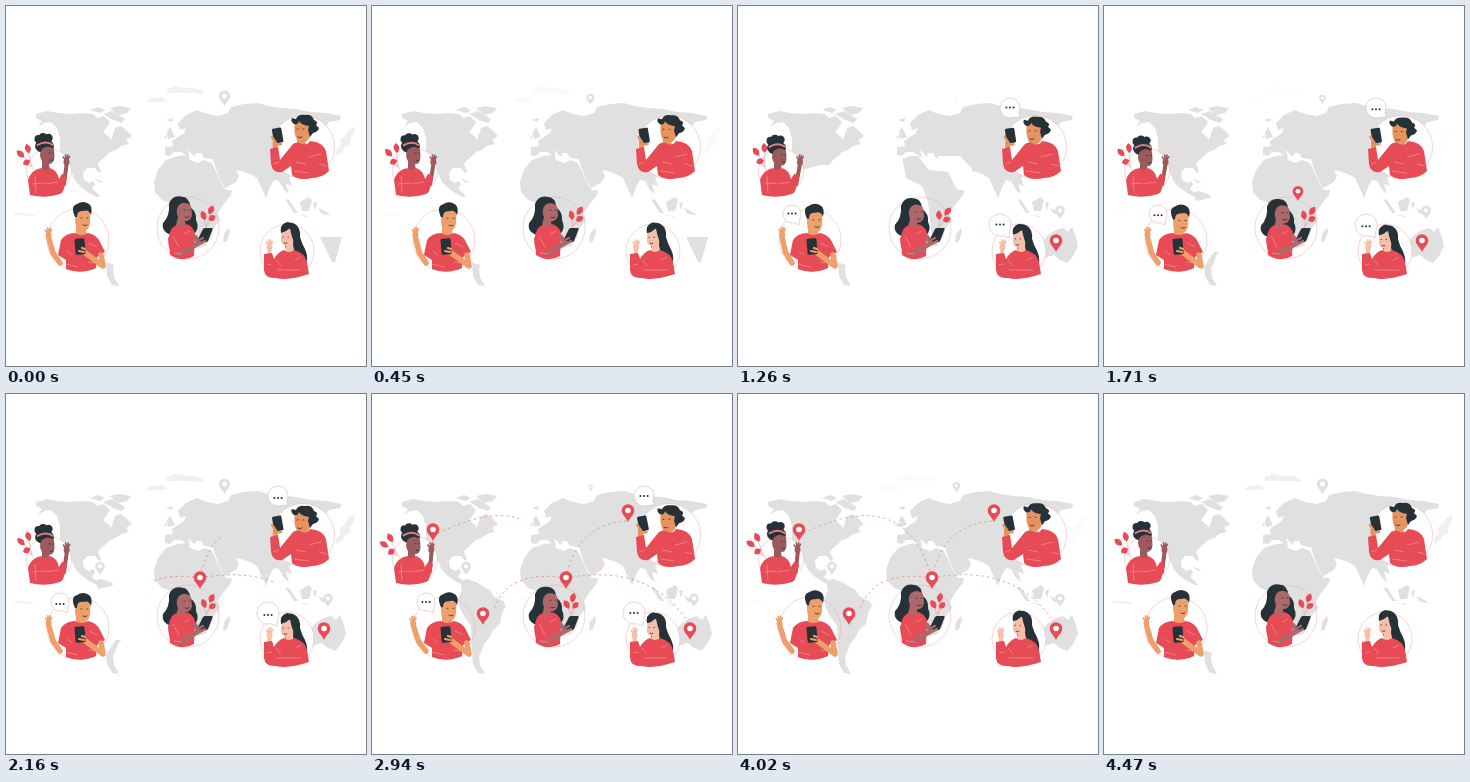
An HTML page for the animation above (4500 ms loop, 360 by 360 pixels).

```html
<!DOCTYPE html>
<html lang="en">
<head>
<meta charset="utf-8">
<style>
html, body { margin: 0; width: 100%; height: 100%; overflow: hidden; background: #fff }
svg { display: block; width: 100%; height: 100% }
.map { fill: #e0e0e0 }
.cloud { fill: #f1f0f0 }
.red { fill: #e74b56 }
.dark { fill: #263238 }
.ring { fill: #fff; stroke: #f0a8ab; stroke-width: .5 }
.clear { fill: none }
.fold { fill: none; stroke: #f3a0a4; stroke-width: .6 }
.line { fill: none; stroke-linecap: round; stroke-linejoin: round }
.face { fill: none; stroke: #263238; stroke-width: .8; stroke-linecap: round }
.arc { fill: none; stroke: #ee7b82; stroke-width: .75; stroke-dasharray: 2.5 3 }
</style>
</head>
<body>
<svg viewBox="0 0 360 360" id="stage">
<defs>
  <clipPath id="africaEast"><path d="M188 182L200 165H229V240H200L193 205Z"/></clipPath>
  <clipPath id="africaNorth"><path d="M164 150H180L191 164L212 166L230 182V240H195L190 196L184 180L168 172Z"/></clipPath>
  <clipPath id="noMiddleEast"><path clip-rule="evenodd" d="M150 90H350V220H150ZM200 150H222L234 163V186H205Z"/></clipPath>
  <clipPath id="tail"><path d="M99 256L114 261V285H98Z"/></clipPath>
  <clipPath id="longTail"><path d="M88 182H111L106 192L92 195ZM99 262L110 246H120V285H98Z"/></clipPath>
  <clipPath id="ausEast"><path d="M314 231H336L328 260Z"/></clipPath>
</defs>
<g class="map">
  <path d="M30 108L41 105L52 107L65 108L76 107L87 108L91 112L98 110L104 116L101 121L97 126L103 131L105 134L109 122L115 120L120 124L126 130L120 134L123 138L115 140L110 144L104 146L100 150L94 155L91 159H82L64 164L58 157L54 148V132L51 122L45 116L38 117L32 121L36 115L30 112Z"/>
  <path d="M84 104L92 101L99 104L94 107ZM97 108L106 105L112 109L119 113L116 117L107 114ZM104 102L113 100L125 102L121 107L112 109Z"/>
  <path id="mexico" d="M62 158L92 158L95 166L93 167L89 162L81 162L77 167L78 174L83 177L87 175L89 178L86 183L91 187L94 191L91 191L83 187L76 182L70 176L66 167ZM88 172L97 176L94 177Z"/>
  <path id="america" d="M88 187L95 185L104 188L112 193L118 196L121 202L131 207L134 212L130 219L128 230L121 236L117 244L112 250L110 256L107 262L108 271L113 280L106 279L101 270L100 258L99 232L92 222L87 212L86 205L90 196Z"/>
  <path id="africa" d="M160 154L172 150L182 149L184 154L192 157L198 154L206 157L211 168L217 180L220 184L226 184L225 189L217 199L212 207L214 214L207 223L205 232L199 240L192 242L188 238L184 225L183 212L180 200L176 196L165 197L156 194L149 186L148 176L152 164Z"/>
  <path d="M223 222L224 226L221 235L217 237L218 228Z"/>
  <path id="eurasia" d="M159 141L167 140L166 135L172 131L178 127L180 122L174 124L172 117L180 109L191 104L198 107L206 109L212 110L222 107L225 101L238 98L252 97L262 100L276 102L290 103L305 106L320 107L335 110L334 114L323 116L319 122L314 129L309 122L301 120L296 126L302 135L296 143L290 148L294 157L290 166L283 172L286 180L280 178L283 188L278 184L273 175L268 174L264 181L260 192L256 183L251 172L244 168L235 165L230 164L233 170L230 176L219 182L213 171L209 160L207 153L198 152L195 147L190 147L189 151L182 144L184 152L175 146L168 146L164 150L159 149Z"/>
  <path d="M161 126L164 121L169 131L162 133ZM158 130L161 129L160 133ZM160 114L167 112L166 116Z"/>
  <path d="M279 193L283 194L292 207L288 207ZM294 196L303 191L306 194L303 205L296 205ZM307 197L311 196L309 204ZM291 209L302 210V211ZM312 202L319 205L325 209L316 208Z"/>
  <path id="australia" d="M303 237L310 229L318 224L325 222L330 226L334 221L338 231L340 240L335 250L329 257L322 254L316 249L306 252L303 246Z"/>
</g>
<g class="cloud" id="clouds">
  <path d="M161 85Q160 81 166 82Q168 78 173 81Q180 82 186 82Q197 83 198 88Q180 86 161 87Z"/>
  <path d="M141 95Q145 90 150 92Q157 89 161 95Q150 97 141 96Z"/>
  <path d="M7 209Q11 205 16 207Q25 207 30 210Z"/>
  <path d="M330 150Q329 143 335 139Q331 134 339 130Q342 122 348 121Q350 127 344 133Q347 139 338 142Q337 148 330 150Z"/>
</g>
<g id="arcs"></g>
<g id="people"></g>
<g id="pins"></g>
<g id="bubbles"></g>
</svg>
<script>
const LOOP = 4500;
const $ = id => document.getElementById(id);
const limb = (d, color, w) => `<path class="line" d="${d}" stroke="${color}" stroke-width="${w}"/>`;
const shape = (cls, d) => `<path class="${cls}" d="${d}"/>`;
const skin = (color, d) => `<path fill="${color}" d="${d}"/>`;
const ring = (x, y, r, cls = '') => `<circle class="ring ${cls}" cx="${x}" cy="${y}" r="${r}"/>`;
const head = (...parts) => `<g class="head">${parts.join('')}</g>`;
const sway = (x, y, angle, ...parts) => `<g class="sway" data-sway="${x} ${y} ${angle}">${parts.join('')}</g>`;
const leaf = (x, y, angle, len) =>
  `<path class="red" d="M0 ${-len}Q6 0 0 ${len}Q-6 0 0 ${-len}" transform="translate(${x} ${y}) rotate(${angle})"/>`;
const hand = (x, y, color) => limb(
  `M${x} ${y}l-3.2 -5M${x} ${y}l-1 -7M${x} ${y}l1.3 -7M${x} ${y}l3 -5.5`, color, 1.6) +
  `<ellipse cx="${x}" cy="${y}" rx="3" ry="3.5" fill="${color}"/>`;

const brown = '#9c5a5c', tan = '#ef9f6b', rose = '#ad686b', amber = '#e6935f', pale = '#f6bfaa';

const people = [
  // north-west
  ring(43, 165, 22.5) +
  sway(27, 164, 12, shape('fold', 'M28 164L16 148M26 161L22 145M25 161L19 157'),
    leaf(14.5, 148, -50, 5), leaf(21.8, 142.5, -18, 5), leaf(20.5, 156.5, 62, 4)) +
  head('<g class="dark"><circle cx="32.5" cy="133" r="4"/><circle cx="37" cy="131" r="4"/><circle cx="42.5" cy="132" r="4.2"/><ellipse cx="38.5" cy="140" rx="9.5" ry="7"/></g>',
    skin(brown, 'M36 143Q42 138 48 143L48.5 151Q48 158 43 158L44 164L36 165L36 155Q32 149 36 143Z'),
    limb('M31.5 139Q40 134 47 139', '#e77d80', 2),
    shape('face', 'M43 147h1M47 147h.5M44 154q1.5 1 3 0')) +
  sway(57, 184, 3, limb('M58 178L60.5 159', brown, 4), hand(60.5, 156, brown)) +
  shape('red', 'M24 189L22 174Q25 164 35 162Q39 166 44 162Q51 164 53 173L56 168Q60 168 61 171L58 182Q57 187 54 188Q39 193 24 189Z') +
  shape('fold', 'M26 178L38 177M39 178L52 176M29 170L30 187'),

  // south-west
  ring(72, 234, 31, 'clear') +
  head(skin(tan, 'M70 206Q77 201 84.5 206L84 217Q83 223 80 224L82 232H70V221Q68 214 70 206Z'),
    shape('dark', 'M69 211Q64 200 71 198Q77 194 83 198Q87 201 85 209Q83 203 77 205Q71 204 71 211Z'),
    shape('face', 'M75 212h1M81 212h1M77 219q2 1.5 4 0')) +
  sway(54, 258, 3, limb('M54 257L47 247L43 233', tan, 5.5), hand(42.5, 229, tan)) +
  shape('red', 'M52 249L55 234Q60 227 69 227Q75 231 82 227Q91 229 94 236L99 246L91 251L90 262Q75 269 60 263V254Z') +
  limb('M95 249L97 260L78 246', tan, 5.5) +
  '<rect class="dark" x="69" y="232.5" width="10" height="16" rx="1.5" transform="rotate(-5 74 240)"/>' +
  limb('M78 246l-5 -1M79 243l-3 -1', tan, 2.2) +
  shape('fold', 'M61 245L66 249M60 258L72 261M82 256L88 257M83 237L91 241'),

  // south
  ring(182, 222, 31, 'clear') +
  sway(201, 224, 14, shape('fold', 'M199 226L205 204M200 221L197 209M201 220L206 212'),
    leaf(197.5, 209.5, -22, 5), leaf(205, 204, 25, 5), leaf(206, 212, 55, 4)) +
  head(shape('dark', 'M163 198Q166 189 175 190.5Q184 191 184 201Q191 206 190 214Q194 222 188 228L166 229Q155 226 157 217Q164 210 163 198Z'),
    skin(rose, 'M173 199Q179 194 185 200L186 209Q185 215 179 215L180 223H169L172 211Q169 204 173 199Z'),
    shape('face', 'M178 204h1M183 204h.5M179 211q2 1 4 0')) +
  shape('red', 'M163 231Q164 221 171 219Q176 224 180 218Q187 220 189 227L188 250Q176 257 164 249Z') +
  limb('M189 231L193 237L199 234', rose, 4.5) +
  limb('M168 246Q177 248 185 242L196 235', rose, 5) +
  shape('red', 'M162 232Q169 224 173 234L177 243L169 250Q162 246 162 232Z') +
  shape('dark', 'M192 233L197 223Q198 222 199 222L206 222Q207 222 206.5 223.5L202 235Q201 236 200 236L193 235Z') +
  limb('M193 234L197 232M195 237L199 235', rose, 2.2) +
  shape('fold', 'M167 230L173 241M178 228L184 225M168 247L176 248'),

  // north-east
  ring(297, 141, 31.5) +
  head(skin(amber, 'M289 116Q297 111 304 118L305 127Q303 135 299 136L303 143H291V134Q287 126 289 116Z'),
    shape('dark', 'M288 118Q284 115 286 112L290 113Q292 108 299 109Q306 108 308 114Q313 116 310 119L313 122Q312 126 307 127L304 131L302 124L303 120Q295 119 293 115Q292 119 288 118Z'),
    shape('face', 'M291 123h1M297 123h1M292 131q2 1.5 4 0')) +
  sway(270, 163, 1.5, limb('M269 148L269 136', amber, 5),
    '<rect class="dark" x="267" y="122" width="9.5" height="15" rx="1.3" transform="rotate(-10 272 130)"/>',
    limb('M270 137L266 131M268 139L275 138', amber, 2.5)) +
  shape('red', 'M264 143L272 141L274 154L287 138Q291 135 296 138Q301 140 304 135Q317 136 320 145L323 165Q316 172 306 172Q293 175 286 169L285 160L276 166Q267 168 265 158Z') +
  shape('fold', 'M290 156L300 158M303 151L315 148M288 165L303 167M267 158L273 156M313 158L321 160'),

  // south-east
  ring(281, 245, 27) +
  head(shape('dark', 'M275 221Q281 214 289 218Q295 222 294 231Q296 238 299 243Q304 254 298 261Q284 261 281 248Z'),
    skin(pale, 'M276 224Q282 219 288 226L287 239L289 248H279L280 240Q274 239 275 231Z'),
    shape('dark', 'M275 227Q273 219 281 216Q289 217 291 228L290 239Q286 234 284 222Q280 226 275 227Z'),
    shape('face', 'M277 231h.6M282 231h.6M278 237q1.5 1 3 0')) +
  sway(263, 262, 3, limb('M263 253L263.5 244', pale, 4), hand(263.5, 241, pale)) +
  shape('red', 'M258 248L266 247L268 253Q272 246 278 244Q283 248 288 244Q299 247 301 256L303 268Q282 275 270 272Q259 273 258 264Z') +
  shape('fold', 'M271 264L295 264M270 254L275 260M289 254L295 251M261 259L266 258'),
];
$('people').innerHTML = people.join('');

// x, y of the tip, time in, time out
const redPins = [
  [318, 246, 480, 4050], [194, 195, 1500, 4050], [256, 128, 2350, 4050],
  [61, 147, 2350, 4050], [111, 231, 2350, 4050],
];
const greyPins = [[322, 213, 450, 4050], [94, 181, 1650, 4050]];
const pin = cls => `<g><path class="${cls}" d="M0 0C-2 -5 -6.3 -7 -6.3 -11.5A6.3 6.3 0 1 1 6.3 -11.5C6.3 -7 2 -5 0 0Z"/><circle cy="-11.5" r="2.8" fill="#fff"/></g>`;
$('pins').innerHTML = redPins.map(() => pin('red')).join('') + pin('map').repeat(greyPins.length + 1);

// centre, radius, tail tip
const bubbles = [[54, 208, 9, 61, 219], [272, 102, 10, 282, 111], [262, 219, 11, 271, 232]];
$('bubbles').innerHTML = bubbles.map(([x, y, r, tx, ty]) => `<g>
  <path fill="#fff" stroke="#e6b0b2" stroke-width=".6" d="M${tx} ${ty}L${x + r * .25} ${y + r * .97}A${r} ${r} 0 1 1 ${x + r * .9} ${y + r * .44}Z"/>
  <g class="dots">${[-3.6, 0, 3.6].map(d => `<circle class="dark" cx="${x + d}" cy="${y - 1}" r="1"/>`).join('')}</g></g>`).join('');

// start, control, end, time in
const arcs = [
  [194, 184, 136, 175, 122, 215, 1650], [194, 184, 205, 130, 255, 127, 1650],
  [194, 184, 278, 168, 318, 231, 1650], [61, 142, 166, 86, 194, 184, 2440],
];
$('arcs').innerHTML = '<path class="arc"/>'.repeat(arcs.length);

const clamp = x => Math.min(1, Math.max(0, x));
const ease = x => { x = clamp(x); return x * x * (3 - 2 * x); };
const pulse = (t, start, end, span = 280) => ease((t - start) / span) * (1 - ease((t - end) / span));
const bob = (t, period) => 1.5 * (1 - Math.cos(t / period * 2 * Math.PI));
const mix = (a, b, u) => a + (b - a) * u;
const clip = (id, name) => $(id).setAttribute('clip-path', name ? `url(#${name})` : 'none');
const move = (el, x, y, s = 1) => el.setAttribute('transform', `translate(${x} ${y}) scale(${s})`);
const swaying = [...document.querySelectorAll('.sway')].map(el => [el, el.dataset.sway.split(' ').map(Number)]);
const heads = document.querySelectorAll('.head');
const dots = document.querySelectorAll('.dots');

function draw(t) {
  const swing = Math.sin(t / LOOP * 2 * Math.PI);
  const breath = Math.cos(t / LOOP * 4 * Math.PI);

  for (const [el, [x, y, angle]] of swaying)
    el.setAttribute('transform', `rotate(${angle * swing} ${x} ${y})`);
  heads.forEach(el => move(el, 0, bob(t, LOOP)));
  dots.forEach(el => move(el, 0, bob(t - 900, 2500)));
  $('clouds').setAttribute('opacity', clamp(breath));

  const partial = t >= 500 && t < 1500;
  clip('africa', !partial ? '' : t < 1080 ? 'africaEast' : 'africaNorth');
  clip('eurasia', partial ? 'noMiddleEast' : '');
  $('mexico').style.display = partial ? 'none' : '';
  clip('america', t < 1700 || t >= 4200 ? 'tail' : t < 2350 ? 'longTail' : '');
  clip('australia', t < 480 ? 'ausEast' : '');
  $('australia').style.display = t < 4200 ? '' : 'none';

  const pins = $('pins').children;
  [...redPins, ...greyPins].forEach(([x, y, start, end], i) =>
    move(pins[i], x, y, pulse(t, start, end) * (i < redPins.length ? 1 : .75)));
  const size = .5 + .4 * breath;
  move(pins[pins.length - 1], 218.5, 95 + 6 * size, size);

  bubbles.forEach(([, , , x, y], i) => {
    const s = pulse(t, 450, 3460, 300);
    $('bubbles').children[i].setAttribute('transform', `translate(${x} ${y}) scale(${s}) translate(${-x} ${-y})`);
  });

  arcs.forEach(([x0, y0, cx, cy, x, y, start], i) => {
    const u = ease((t - start) / 1000);
    const ax = mix(x0, cx, u), ay = mix(y0, cy, u);
    const el = $('arcs').children[i];
    el.setAttribute('d', `M${x0} ${y0}Q${ax} ${ay} ${mix(ax, mix(cx, x, u), u)} ${mix(ay, mix(cy, y, u), u)}`);
    el.setAttribute('opacity', u > 0 ? 1 - ease((t - 3950) / 350) : 0);
  });
}

const begin = performance.now();
function tick() {
  draw((performance.now() - begin) % LOOP);
  requestAnimationFrame(tick);
}
tick();
</script>
</body>
</html>
```
